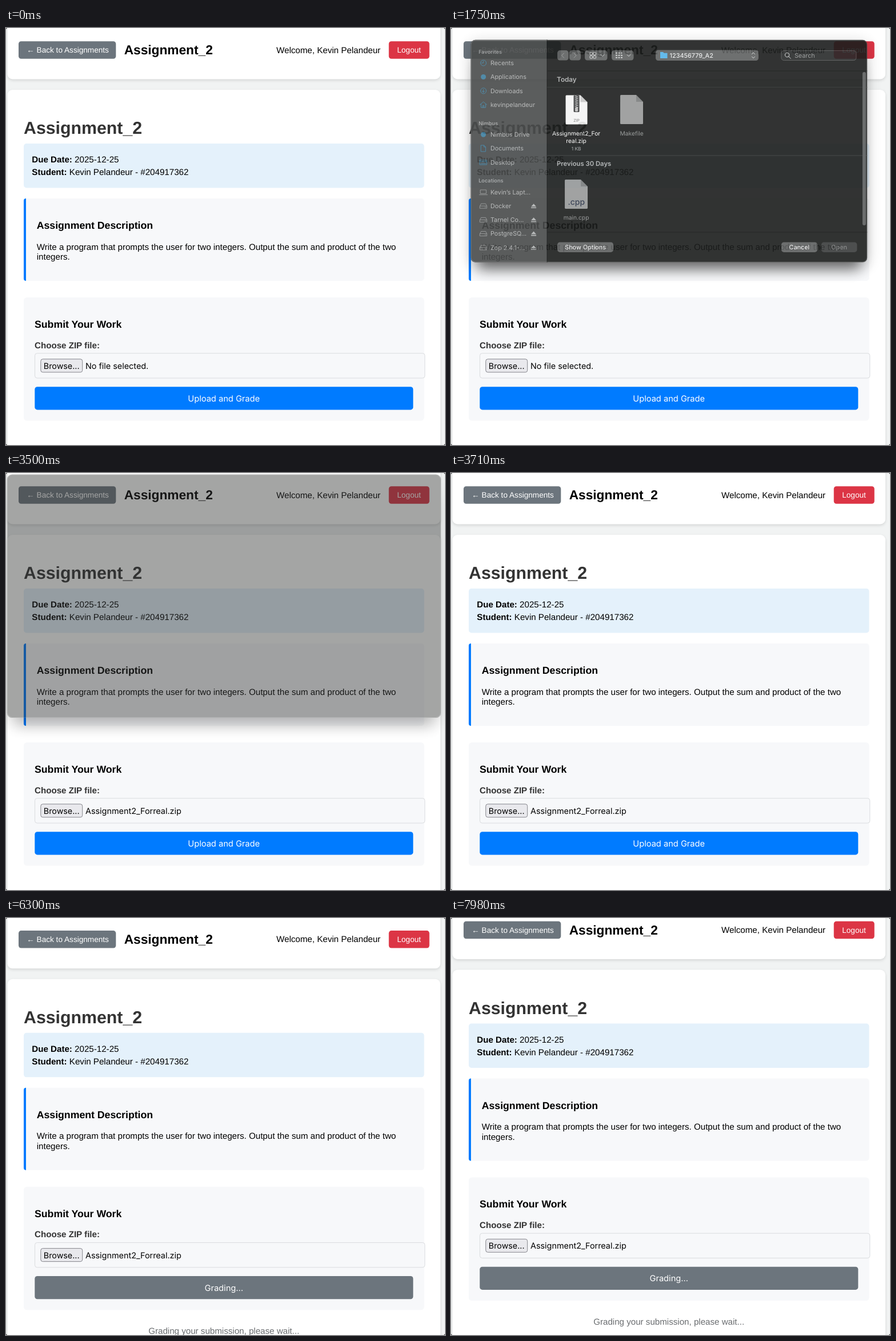
An HTML page for the animation above (8000 ms loop, 768 px wide and 729 px high).

```html
<!DOCTYPE html>
<html lang="en">
<head>
<meta charset="utf-8">
<title>Assignment upload</title>
<style>
html, body { margin: 0; width: 100%; height: 100%; overflow: hidden; background: #f1f3f3; }
svg { display: block; width: 100%; height: 100%; }
text { font-family: "Liberation Sans", Arial, sans-serif; white-space: pre; text-rendering: geometricPrecision; }
.ui { font-family: Inter, "Open Sans", sans-serif; }
.card { fill: #fff; filter: drop-shadow(0 2px 2.5px rgba(0,0,0,.12)); }
.shade { filter: blur(12px); }
.halo { filter: drop-shadow(0 6px 14px rgba(0,0,0,.2)); }
.line { fill: none; stroke-width: 1; stroke-linecap: round; stroke-linejoin: round; }
</style>
</head>
<body>
<svg id="stage" viewBox="0 0 768 729" preserveAspectRatio="none"></svg>
<script>
const LOOP = 8000, TICK = 70;
const STUDENT = "Kevin Pelandeur";
const EM = 15.14;

const rect = (x, y, x2, y2, r, fill, extra = "") =>
  `<rect x="${x}" y="${y}" width="${x2 - x}" height="${y2 - y}" rx="${r}" fill="${fill}" ${extra}/>`;
const text = (x, y, size, str, fill = "#000", extra = "") =>
  `<text x="${x}" y="${y}" font-size="${size}" fill="${fill}" ${extra}>${str}</text>`;
const line = (d, color, extra = "") => `<path class="line" d="${d}" stroke="${color}" ${extra}/>`;
const BOLD = 'font-weight="700"';
const UI = 'class="ui"';
const MID = 'text-anchor="middle"';

function page() {
  return [
    rect(2.5, -30, 760, 89.5, 9, "#fff", 'class="card"'),
    rect(22, 23.3, 192.3, 53.8, 4.5, "#6c757d"),
    text(36.2, 43.2, 13.62, "← Back to Assignments", "#fff"),
    text(206.7, 46.2, 22.7, "Assignment_2", "#000", BOLD),
    text(473, 43.6, EM, "Welcome, " + STUDENT),
    rect(669.7, 23.3, 740.7, 53.8, 4.5, "#dc3545"),
    text(705, 43.2, 13.62, "Logout", "#fff", MID),

    rect(2.5, 108, 760, 900, 9, "#fff", 'class="card"'),
    text(31, 185.3, 30.3, "Assignment_2", "#333", BOLD),
    rect(31, 202, 731.5, 279.5, 4.7, "#e4f1fb"),
    text(45.3, 235, EM, `<tspan ${BOLD}>Due Date:</tspan> 2025-12-25`),
    text(45.3, 257.3, EM, `<tspan ${BOLD}>Student:</tspan> ${STUDENT} - #204917362`),

    rect(31, 298, 731.5, 442, 4.7, "#f7f8fa"),
    '<path d="M35 298v144a4 4 0 0 1-4-4V302a4 4 0 0 1 4-4" fill="#007bff"/>',
    text(53.7, 351.3, 17.7, "Assignment Description", "#000", BOLD),
    text(53.7, 387.5, EM, "Write a program that prompts the user for two integers. Output the sum and product of the two"),
    text(53.7, 405, EM, "integers."),

    rect(31, 471, 731.5, 686.5, 5.5, "#f7f8fa"),
    text(50, 523.9, 17.7, "Submit Your Work", "#000", BOLD),
    text(50, 559.6, EM, "Choose ZIP file:", "#333", BOLD),
    rect(50.5, 568.7, 732.8, 612, 4, "#f7f8fa", 'stroke="#dadcdf"'),
    rect(60.8, 578.8, 133.7, 601.8, 3.6, "#e9e9ed", 'id="browse" stroke="#85858c"'),
    text(97.2, 595.8, 14.3, "Browse...", "#000", `${UI} ${MID}`),
    text(139, 595.8, 14.4, "", "#000", `${UI} id="file"`),
    rect(50.3, 627.2, 712.3, 667.4, 4.5, "#007bff", 'id="submit"'),
    text(381.2, 652.8, 14.65, "", "#fff", `${UI} ${MID} id="submitText"`),
    text(381.2, 728.6, EM, "Grading your submission, please wait...", "#6a6d70", `${MID} id="wait"`)
  ].join("");
}

const GREY = "#b2b4b4", BLUE = "#3f7f9f";

// Sidebar glyphs, drawn around their centre
const icons = {
  clock: line("M-5 0a5 5 0 1 0 10 0a5 5 0 1 0-10 0M0-3V0H-3", BLUE),
  dot: `<circle r="4.500" fill="${BLUE}"/>`,
  down: line("M-5 0a5 5 0 1 0 10 0a5 5 0 1 0-10 0M0-2.5V2.5M-2 .6L0 2.6L2 .6", BLUE),
  home: line("M-6 0L0-5L6 0M-4-1V5H4V-1M-1 5V1.5H1V5", BLUE),
  doc: line("M-4-5.5H1L4-2.5V5.5H-4zM1-5.5V-2.5H4", BLUE),
  desk: line("M-6-4H6V4H-6zM-6-1.5H6M-4 2H4", BLUE),
  laptop: line("M-5-4H5V2.5H-5zM-7 4.5H7", "#8c8e8e"),
  drive: line("M-6 0L-4-4H4L6 0V4H-6zM-6 0H6M3 2H4", "#8c8e8e")
};

function sidebar() {
  const heads = [["Favorites", 41.5], ["Nimbus", 166.5], ["Locations", 267]];
  const items = [
    ["clock", "Recents", 61], ["dot", "Applications", 85.4], ["down", "Downloads", 109.8],
    ["home", "kevinpelandeur", 134], ["dot", "Nimbus Drive", 186.2], ["doc", "Documents", 210.5],
    ["desk", "Desktop", 235], ["laptop", "Kevin’s Lapt...", 287], ["drive", "Docker", 311.2, 1],
    ["drive", "Tarnel Co...", 335.4, 1], ["drive", "PostgreSQ...", 359.6, 1], ["drive", "Zop 2.4.1-...", 384, 1]
  ];
  return heads.map(([s, y]) => text(48, y + 3.4, 9.2, s, "#a0a2a2", `${UI} font-weight="600"`)).join("") +
    items.map(([icon, s, y, eject]) =>
      `<g transform="translate(56.5 ${y})">${icons[icon]}</g>` +
      text(68.8, y + 3.9, 10.8, s, GREY, UI) +
      (eject ? `<path d="M140 ${y + 1}l4.5-5l4.5 5zM140 ${y + 2.3}h9v1.6h-9z" fill="${GREY}"/>` : "")
    ).join("");
}

function sheet(x, y, w, fill) {
  return `<path d="M${x + 1.5} ${y}h${w - 13.5}l12 12v37.5q0 1.5-1.5 1.5h${3 - w}q-1.5 0-1.5-1.5v-48q0-1.5 1.5-1.5" fill="${fill}"/>` +
    `<path d="M${x + w - 12} ${y}v12h12z" fill="#000" fill-opacity=".18"/>`;
}

function dots(x) {
  let out = "";
  for (let i = 0; i < 9; i++) {
    const gx = x + (i % 3) * 4.5, gy = 42.6 + Math.floor(i / 3) * 4;
    out += rect(gx, gy, gx + 3, gy + 2, .6, "#d0d2d2");
  }
  return out;
}

function toolbar() {
  const btn = "#5f6161", pale = "#d4d6d6";
  return [
    rect(186, 39, 205.5, 56.5, 4.5, btn), rect(207, 39, 227, 56.5, 4.5, btn),
    line("M197.5 44l-4 4l4 4M215 44l4 4l-4 4", "#989a9a", 'stroke-width="1.4"'),
    rect(234, 39, 273.5, 56.5, 4.5, btn), rect(281, 39, 319.5, 56.5, 4.5, btn),
    [0, 1, 2, 3].map(i => {
      const x = 243 + (i % 2) * 6, y = 42.5 + (i >> 1) * 6;
      return rect(x, y, x + 4.5, y + 4.5, .8, "none", `stroke="${pale}"`);
    }).join(""),
    dots(288),
    line("M262 46.5l3 3l3-3M308 46.5l3 3l3-3", pale, 'stroke-width="1.4"'),
    rect(358, 38.5, 538, 57, 4.5, btn),
    '<path d="M366 42h5l1.5 1.8h6V53H366z" fill="#54b4ea"/>',
    text(382.5, 51.6, 10.8, "123456779_A2", "#e8eaea", `${UI} font-weight="500"`),
    line("M526.5 45.5l2.5-2.7l2.5 2.7M526.5 50l2.5 2.7l2.5-2.7", pale, 'stroke-width="1.4"'),
    rect(578, 39.5, 709, 56.5, 4.5, "#292b2b", 'stroke="#555757"'),
    line("M584.5 47a3.7 3.7 0 1 0 7.4 0a3.7 3.7 0 1 0-7.4 0M591 50l3.3 3.3", pale, 'stroke-width="1.3"'),
    text(601, 51.7, 10.8, "Search", "#929494", UI)
  ].join("");
}

function files() {
  const label = (x, y, s, fill) => text(x, y, 10.3, s, fill, `${UI} ${MID}`);
  let zipper = "";
  for (let y = 119; y < 138; y += 3) zipper += line(`M217 ${y}h2.5M219.5 ${y + 1.5}h2.5`, "#ddd");
  return [
    `<g id="picked">${rect(189, 112.7, 249, 173.5, 4, "#4b4d4d")}${rect(173.5, 177.5, 265, 191.5, 3, "#0a58d0")}${rect(197, 190.5, 242, 204.5, 3, "#0a58d0")}</g>`,
    text(185, 93.7, 11.7, "Today", GREY, `${UI} font-weight="600"`),
    sheet(200.5, 117.5, 38, "#f4f4f4"),
    rect(214.5, 117.5, 224.5, 147, 1.5, "#38393a"), zipper,
    rect(217, 138.5, 222, 146, 1.5, "#bbb"),
    text(219.5, 163.5, 7, "ZIP", "#777", `${UI} ${MID}`),
    label(219, 187.5, "Assignment2_For", "#fff"),
    label(219, 201, "real.zip", "#fff"),
    text(219, 213.6, 8.4, "1 KB", "#a8aaaa", `${UI} ${MID}`),
    sheet(296, 117, 40, "#979999"),
    label(316, 187.5, "Makefile", "#8f9191"),
    text(185, 240.8, 11.3, "Previous 30 Days", GREY, `${UI} font-weight="600"`),
    sheet(199, 265, 40, "#979999"),
    text(219.3, 309.5, 14, ".cpp", "#2b3448", `${UI} ${MID} font-weight="500"`),
    label(219, 335, "main.cpp", "#8f9191")
  ].join("");
}

function dialog() {
  const button = (x, x2, s, fill, ink, id = "") =>
    `<g ${id}>` + rect(x, 374.5, x2, 392, 4.5, fill) +
    text((x + x2) / 2, 387.2, 10.8, s, ink, `${UI} ${MID} font-weight="500"`) + "</g>";
  const rule = (y, c) => line(`M168.5 ${y}H728`, c);
  return rect(46, 60, 717, 421, 8, "#000", 'class="shade" opacity=".6"') +
    rect(34.5, 20.7, 728.3, 409.7, 8, "#1c1e1d", 'class="halo" id="plate"') +
    '<g id="content">' +
    '<path d="M168 20.700H42.500a8 8 0 0 0-8 8V401.700a8 8 0 0 0 8 8H168z" fill="#4a4c4c"/>' +
    line("M168 20.700V409.700", "#0d0e0e") +
    rule(75, "#111212") + rule(103.5, "#2d2f2f") + rule(223, "#383a3a") + rule(357, "#111212") +
    rect(720, 77, 726, 345, 3, "#5c5e5e") +
    sidebar() + toolbar() + files() +
    button(186, 284, "Show Options", "#5f6161", "#f0f0f0") +
    button(578, 641, "Cancel", "#5f6161", "#f0f0f0") +
    button(648, 710.5, "Open", "#3b3d3d", "#7f8181", 'id="open"') +
    "</g>" + rect(35, 21.2, 727.8, 409.2, 8, "none", 'stroke="#fff" stroke-opacity=".22"');
}

const stage = document.getElementById("stage");
stage.innerHTML = `<rect width="768" height="729" fill="#f1f3f3"/><g id="page">${page()}</g><g id="dialog">${dialog()}</g>` +
  '<path d="M0 727l2 2H0zM768 727l-2 2h2zM0 2l2-2H0zM768 2l-2-2h2z" fill="#444"/>';
const $ = id => document.getElementById(id);
const set = (id, name, value) => $(id).setAttribute(name, value);
const show = (id, on) => { $(id).style.display = on ? "" : "none"; };
const say = (id, s) => { if ($(id).textContent !== s) $(id).textContent = s; };
const clamp = v => Math.max(0, Math.min(1, v));

function scrollAt(t) {
  if (t < 7560) {
    const p = clamp((t - 6230) / 490);
    return 21.7 * p * p * (3 - 2 * p);
  }
  return t < 7980 ? 21.7 - 3.4 * clamp((t - 7490) / 280) : 17.5;
}

function drawDialog(t) {
  const open = t >= 1610 && t < 3710, closing = t >= 3500;
  show("dialog", open);
  if (!open) return;
  const left = 1 - clamp((t - 1540) / 490);
  const scale = (1 - .2 * left ** 1.5) / .914;
  const alpha = closing ? .44 * (3710 - t) / 210 : Math.min(1, .9 * (t - 1540) / 210);
  set("dialog", "transform", `translate(381.4 215.3) scale(${scale}) translate(-381.4 -215.3)`);
  set("dialog", "opacity", alpha);
  set("plate", "fill", closing ? "#323433" : "#1c1e1d");
  show("content", !closing);
  const picked = t >= 2870;
  show("picked", picked);
  const [face, label] = $("open").children;
  face.setAttribute("fill", picked ? "#0a64e0" : "#3b3d3d");
  label.setAttribute("fill", picked ? "#fff" : "#7f8181");
}

function draw(time) {
  const t = Math.floor((time % LOOP) / TICK) * TICK;
  const grading = t >= 5180;
  set("page", "transform", `translate(0 ${-scrollAt(t)})`);
  set("browse", "fill", t < 1050 || t >= 1610 ? "#e9e9ed" : t === 1400 ? "#b1b1b9" : "#d0d0d7");
  say("file", t < 3500 ? "No file selected." : "Assignment2_Forreal.zip");
  set("submit", "fill", grading ? "#6c757d" : t >= 4830 ? "#0056b3" : "#007bff");
  say("submitText", grading ? "Grading..." : "Upload and Grade");
  show("wait", grading);
  drawDialog(t);
}

const start = performance.now();
function frame() {
  draw(performance.now() - start);
  requestAnimationFrame(frame);
}
frame();
</script>
</body>
</html>
```
